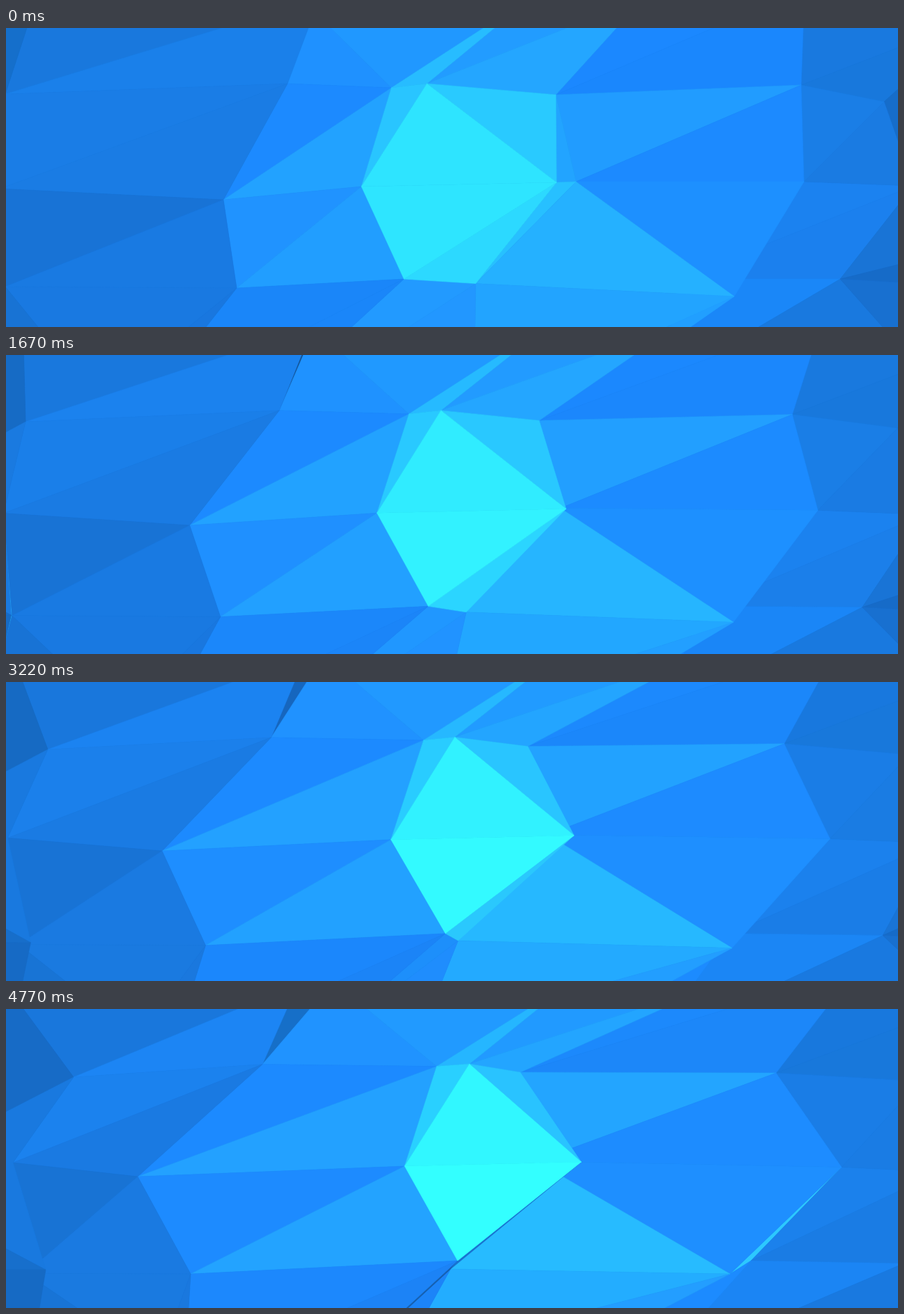
An HTML page with a canvas for the animation above (4.84 s loop, 1280 by 430 pixels).

```html
<!DOCTYPE html>
<html lang="en">
<head>
<meta charset="utf-8">
<title>Low poly surface</title>
<style>
html, body { margin: 0; width: 100%; height: 100%; overflow: hidden; background: #1565b8; }
canvas { display: block; }
</style>
</head>
<body>
<canvas id="stage" width="1280" height="430"></canvas>
<script>
const W = 1280, H = 430, LOOP = 4840, STEPS = 69;
const ctx = document.getElementById('stage').getContext('2d');

// Inner vertices: x at start, middle and end, then y at start and end.
const upper = {
  A1: [-1, 42, 97, 95, 98],
  A2: [404, 387, 368, 80, 79.5],
  A3: [553, 588, 618, 86, 82.5],
  A4: [604, 633, 665, 80, 79],
  A5: [789, 757, 738, 96, 91],
  A6: [1141, 1123, 1105, 82, 92],
  A7: [1260, 1287, 1312, 106, 104],
  B0: [-8, -1, 10, 231, 221],
  B1: [312, 245, 189, 247, 241],
  B2: [510, 541.5, 572, 228, 226],
  R: [790, 809, 825.5, 222, 220],
  Q: [818, 787, 761, 221, 219],
  B5: [1145, 1173, 1199, 221, 227.5],
  B6: [1302, 1324, 1340, 227, 234]
};
const lower = {
  C0: [-1, 13, 28.5, 372, 380],
  C1: [-30, 21, 57, 374, 375],
  C2: [331, 298, 265, 374, 381],
  C3: [571, 618, 648, 361, 362],
  S: [674, 655, 638, 367.5, 374],
  C5: [1045, 1043, 1039, 386, 381],
  T: [965, 1022, 1069, 361, 362],
  C7: [1197, 1242, 1288, 361, 366]
};

// Where edges cross the stage border.
const top0 = {
  t0: [30, 24.5, 25],
  t1: [310, 322, 333],
  tL: [434, 419.5, 403],
  tR: [421, 429, 436],
  t3: [466, 492, 518],
  t4: [685, 719, 749],
  t5: [701, 734, 763],
  t6: [805, 863, 908],
  t7: [876, 911, 941],
  tm: [1015, 1025, 1035],
  t8: [1144, 1160, 1176]
};
const bottom = {
  d0: [-45, 8.5, 48],
  d1: [46, 75, 102],
  d2: [262, 251, 247],
  e2: [287, 275, 262],
  b3: [435, 468, 490],
  d3: [496, 538, 574],
  e3: [578, 572, 577],
  d4: [673, 637, 607],
  b5: [948, 888, 848],
  d5: [982, 962, 945],
  d6: [955, 980, 1008],
  d7: [1080, 1107, 1138],
  d8: [1258, 1310, 1360]
};
const left = { L0: [0, 0, 0], L1: [128, 151, 179], L2: [356, 329, 313], L3: [375, 375, 375], L4: [H, H, H] };
const right = { r0: [0, 0, 0], ra: [-20, -20, -20], rm: [-18, -18, -18], r2: [310, 304, 300], r3: [373, 373, 373], r4: [H, H, H] };

// Faces from back to front: corners | colours spread evenly over the loop.
const faces = [
  'A2 tL tR | 123f70 134a86 145497 1663bb 166bc4 166fc8',
  'B5 C5 T | 2cc8ff',
  'T B5 B6 | 1b82f0 1b81ec',
  'T B6 C7 | 1b80ee 1a7ce4',
  'T C7 d7 d6 | 1a87f8 1b85f4',
  'T C5 d5 d6 | 1c8bff',
  'C7 d7 d8 | 1979df 1979e0',
  'C7 B6 r2 | 1974d6',
  'C7 r2 r3 | 166bc8',
  'C7 r3 r4 d8 | 1870d0',
  'A6 t8 rm | 1979df 1878dd',
  'A6 rm ra A7 | 1878dc 1878db',
  'A7 ra B6 | 166dca',
  'A6 B5 A7 | 1a7ee6 1a7de6',
  'A7 B5 B6 | 1a7be2 1a7ce4',
  'A5 t7 tm | 1b88ff 1c89fc',
  'A5 tm t8 A6 | 1a87fd 1c87f9',
  'A4 t5 t6 | 229cff 219aff',
  'A4 t6 t7 A5 | 24a6ff 23a5ff',
  'A5 A6 Q | 219cff 23a5ff',
  'Q A6 B5 | 1c8aff 1d8cff',
  'Q B5 C5 | 1d90ff 1e8fff',
  'A5 Q R | 22a4ff 1e8cff',
  'R Q S | 27c0ff 1c80e6 1c80e6 1c80e6 1c80e6 1c80e6',
  'S Q C5 | 25b1ff 27bbff',
  'S C5 b5 d4 | 22a4ff 23adff',
  'C5 b5 d5 | 219fff 239eff',
  'S e3 d4 | 2297ff 2092ff 1c84f8',
  'C3 S e3 d3 | 229aff 2199ff 2097ff 1f94ff 1a86f4 1660b0',
  'A2 tR t3 A3 | 1f91ff 2093ff',
  'A3 t3 t4 | 2098ff 219aff',
  'A3 t4 t5 A4 | 27bcff 25b6ff',
  'A2 A3 B1 | 1c8aff',
  'A3 B2 B1 | 22a2ff 23a1ff',
  'B1 B2 C2 | 2093ff 1e8fff 1d8bff',
  'B2 C3 C2 | 219eff 23a3ff',
  'C2 C3 b3 e2 | 1a86f9 1c88fd',
  'C3 b3 d3 | 1a86f9 1c83f6',
  'B0 C0 C1 | 2ab8ff',
  'C1 C0 d0 | 2ab8ff',
  'A1 t0 t1 | 1978dd 1977dc',
  'A1 t1 tL A2 | 1a80ea 1c85f4',
  'A1 A2 B0 | 1a7de6 1b82ee',
  'A2 B1 B0 | 1a7ce4 1a7ae2',
  'B0 B1 C0 | 1873d6 1873d4',
  'B1 C2 C0 | 197ae2 1a7ae1',
  'C0 C2 d2 d1 | 1979e1 1a7ae0',
  'C2 d2 e2 | 1977df 1a78de',
  'C0 d0 d1 | 1873d4 1874d6',
  'R S C3 | 2cd9ff 2bd8ff 2bd4ff 2bcfff 29bdfa 1872d0',
  'A3 A4 B2 | 29c5ff 29d0ff',
  'A4 A5 R | 29caff 29c3ff',
  'A4 R B2 | 2ee4ff 31efff 31f7ff',
  'B2 R C3 | 2ee5ff 33f8ff 33ffff',
  'L0 t0 A1 L1 | 156fcb 1669c2 176bc6',
  'L1 A1 B0 C1 L2 | 1a7ae0 1979df',
  'L2 C1 L3 | 166bc6 176fcc',
  'L3 C1 d0 L4 | 166bc6 166ac4'
].map(line => {
  const [pts, cols] = line.split(' | ').map(s => s.split(' '));
  return { pts, cols: cols.map(c => [0, 2, 4].map(i => parseInt(c.substr(i, 2), 16))) };
});

// Parabola through three values at u = 0, 0.5 and 1.
const bend = ([a, b, c], u) => a * (1 - u) * (1 - 2 * u) + 4 * b * u * (1 - u) + c * u * (2 * u - 1);
const mix = (a, b, k) => a + (b - a) * k;

function place(u) {
  const pos = {};
  const each = (set, fn) => { for (const k in set) pos[k] = fn(set[k]); };
  each({ ...upper, ...lower }, p => [bend(p, u), mix(p[3], p[4], u)]);
  each(top0, p => [bend(p, u), 0]);
  each(bottom, p => [bend(p, u), H]);
  each(left, p => [-60, bend(p, u)]);
  each(right, p => [1400, bend(p, u)]);
  return pos;
}

function shade(cols, u) {
  const f = u * (cols.length - 1);
  const i = Math.min(Math.floor(f), Math.max(cols.length - 2, 0));
  const next = cols[i + 1] || cols[i];
  return `rgb(${cols[i].map((v, n) => Math.round(mix(v, next[n], f - i)))})`;
}

function draw(u) {
  const pos = place(u);
  ctx.fillStyle = '#1565b8';
  ctx.fillRect(0, 0, W, H);
  ctx.lineWidth = 0.6;
  ctx.lineJoin = 'bevel';
  for (const { pts, cols } of faces) {
    ctx.beginPath();
    for (const p of pts) ctx.lineTo(...pos[p]);
    ctx.closePath();
    ctx.fillStyle = ctx.strokeStyle = shade(cols, u);
    ctx.fill();
    ctx.stroke();
  }
}

const start = performance.now();
function tick() {
  const t = (performance.now() - start) % LOOP;
  const step = Math.min(Math.floor((t + 16) * STEPS / LOOP), STEPS - 1);
  draw(step / (STEPS - 1));
  requestAnimationFrame(tick);
}
tick();
</script>
</body>
</html>
```
